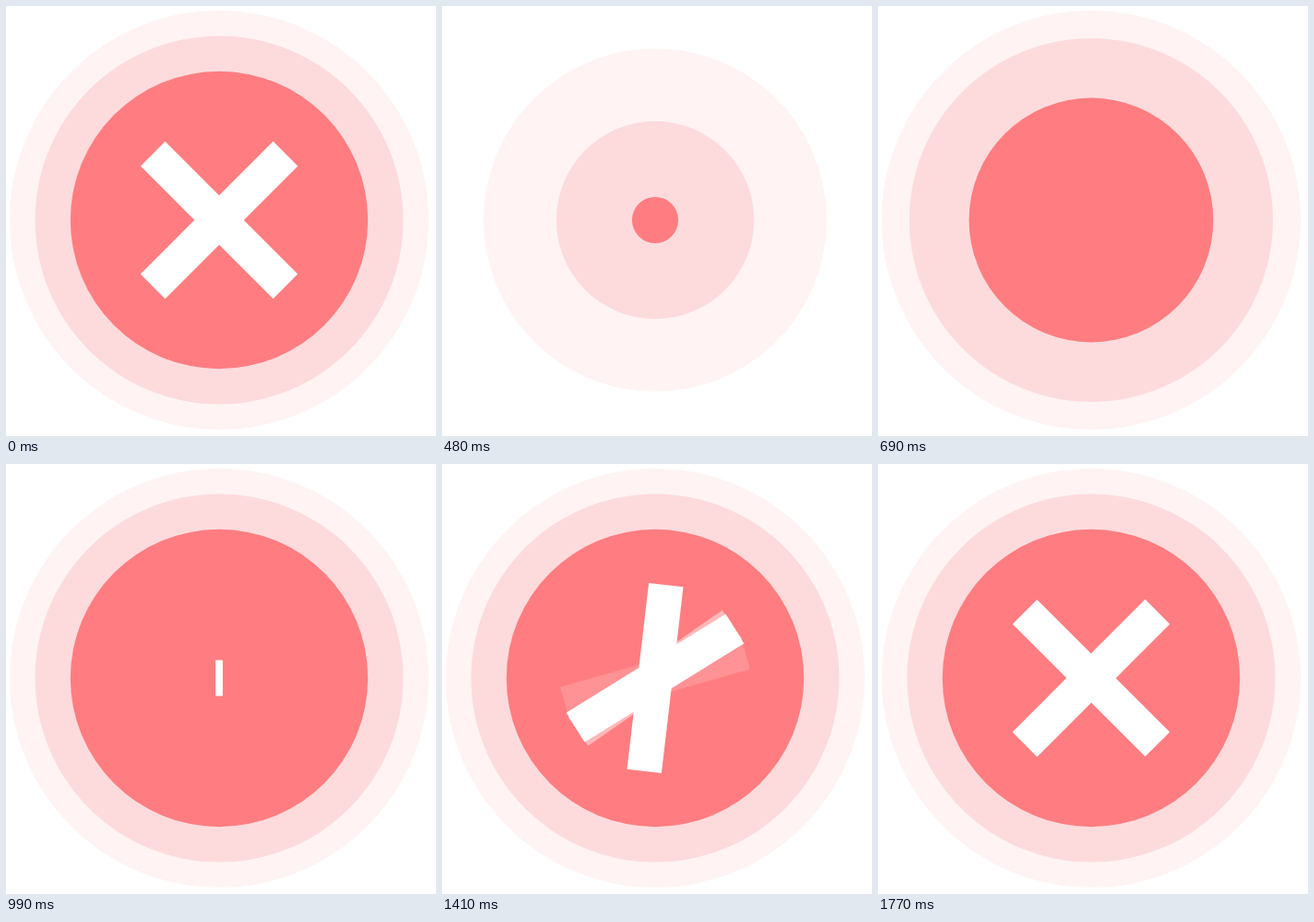
Write an HTML page that moves like this. It is 466x466 px and loops after 2250 ms.

```html
<!DOCTYPE html>
<html lang="en">
<head>
<meta charset="utf-8">
<title>Error mark</title>
<style>
  html, body {
    margin: 0;
    width: 100%;
    height: 100%;
    overflow: hidden;
    background: #fff;
  }
  svg {
    display: block;
    width: 100vw;
    height: 100vh;
  }
  circle, g, rect {
    transform-box: view-box;
    transform-origin: 231px 232px;
    animation: 2250ms linear infinite;
  }

  .outer  { fill: #fff3f3; animation-name: grow-outer; }
  .middle { fill: #fddbdd; animation-name: grow-middle; }
  .inner  { fill: #ff7d80; animation-name: grow-inner; }
  .cross  { fill: #fff;    animation-name: grow-cross; }

  .left  { animation-name: turn-left; }
  .right { animation-name: turn-right; }
  /* faint copies run slightly behind and ahead of the solid bar */
  .late  { opacity: .16; animation-delay: -2209ms; }
  .early { opacity: .45; animation-delay: -11ms; }

  /* the finished mark holds, cuts to blank, then each layer grows in turn */
  @keyframes grow-outer {
    0%      { scale: 1; animation-timing-function: step-end; }
    5.333%  { scale: 0; animation-timing-function: cubic-bezier(.48, 0, .5, 1); }
    28.933%, 100% { scale: 1; }
  }
  @keyframes grow-middle {
    0%      { scale: 1; animation-timing-function: step-end; }
    5.333%  { scale: 0; }
    8.933%  { scale: 0; animation-timing-function: cubic-bezier(.5, 0, .5, 1); }
    32.933%, 100% { scale: 1; }
  }
  @keyframes grow-inner {
    0%      { scale: 1; animation-timing-function: step-end; }
    5.333%  { scale: 0; }
    14.267% { scale: 0; animation-timing-function: cubic-bezier(.5, 0, .5, 1); }
    38.267%, 100% { scale: 1; }
  }
  @keyframes grow-cross {
    0%      { scale: 1; animation-timing-function: step-end; }
    5.333%  { scale: 0; }
    40.889% { scale: 0; animation-timing-function: cubic-bezier(.5, 0, .5, 1); }
    50.667%, 100% { scale: 1; }
  }

  /* angles reset while the cross is scaled to nothing */
  @keyframes turn-left {
    0%      { rotate: -135deg; animation-timing-function: step-end; }
    10%     { rotate: 0deg; }
    48.889% { rotate: 0deg; animation-timing-function: cubic-bezier(.5, 0, .5, 1); }
    67.111%, 100% { rotate: -135deg; }
  }
  @keyframes turn-right {
    0%      { rotate: 135deg; animation-timing-function: step-end; }
    10%     { rotate: 0deg; }
    59.2%   { rotate: 0deg; animation-timing-function: cubic-bezier(.5, 0, .5, 1); }
    79.022%, 100% { rotate: 135deg; }
  }
</style>
</head>
<body>
<svg viewBox="0 0 466 466" aria-hidden="true">
  <circle class="outer" cx="231" cy="232" r="227"/>
  <circle class="middle" cx="231" cy="232" r="199.5"/>
  <circle class="inner" cx="231" cy="232" r="161.2"/>
  <g class="cross">
    <rect class="left late" x="212.2" y="130.4" width="37.6" height="203.2"/>
    <rect class="left early" x="212.2" y="130.4" width="37.6" height="203.2"/>
    <rect class="left" x="212.2" y="130.4" width="37.6" height="203.2"/>
    <rect class="right" x="212.2" y="130.4" width="37.6" height="203.2"/>
  </g>
</svg>
</body>
</html>
```
